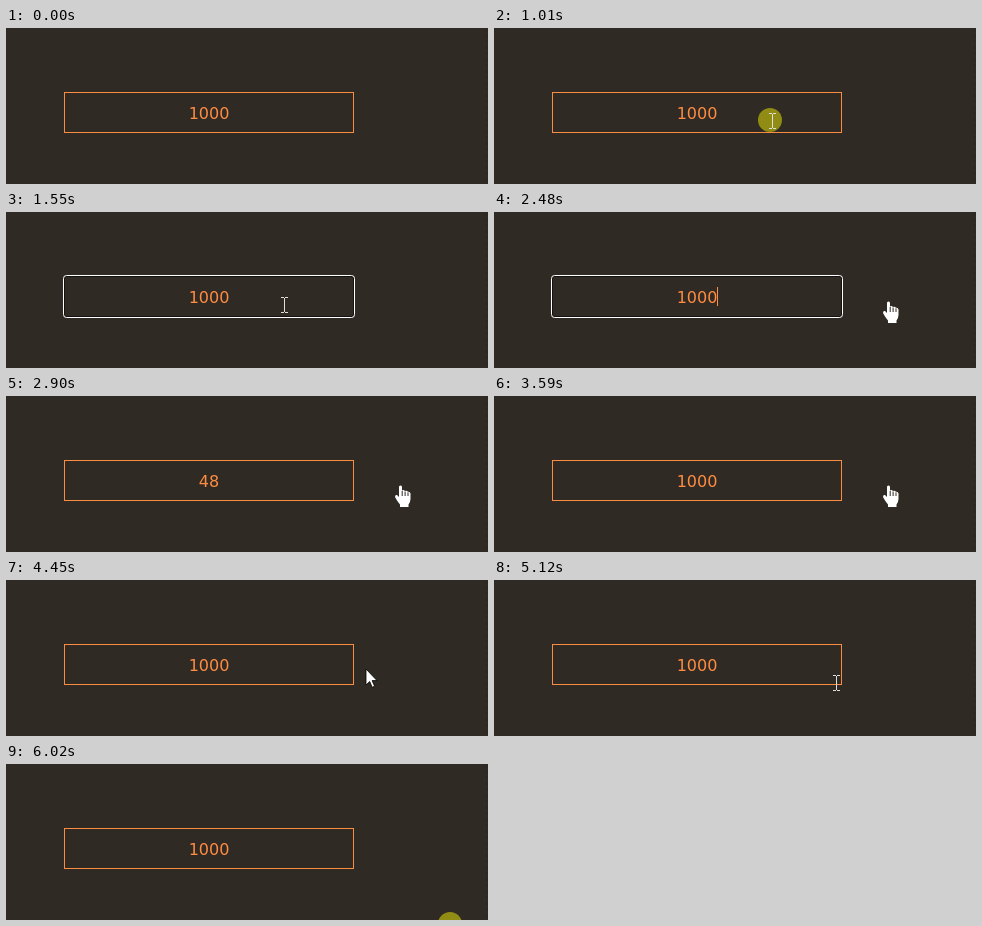
Animation of 482x156 px, one loop 6.15 s. Source, as an HTML page:

```html
<!DOCTYPE html>
<html lang="en">
<head>
<meta charset="utf-8">
<title>Counter input</title>
<style>
  html, body { margin: 0; width: 100%; height: 100%; overflow: hidden; background: #302a24; }
  svg { display: block; }
  text { font: 16px "DejaVu Sans", Verdana, sans-serif; fill: #ff8c42; text-anchor: middle; }
  .line { fill: none; stroke-width: 1; }
</style>
</head>
<body>
<svg width="482" height="156" viewBox="0 0 482 156">
  <path class="line" d="M480.5 0V156" stroke="#29241f" stroke-dasharray="3 3"/>
  <rect id="border" class="line" x="58.5" y="64.5" width="289" height="40" stroke="#f98b42"/>
  <g id="focus" class="line">
    <rect x="58.5" y="64.5" width="289" height="40" rx="2" stroke="#14110e"/>
    <rect x="57.5" y="63.5" width="291" height="42" rx="3" stroke="#fff"/>
  </g>
  <text id="value" x="203" y="91">1000</text>
  <rect id="caret" x="223" y="75" width="1" height="19" fill="#ff8c42"/>
  <g id="pointer">
    <circle id="press" cx="-2" cy="-1" r="12" fill="#918c14"/>
    <path id="beam" class="line" stroke="#e0deda"
      d="M-3-7.5H0M1-7.5H4M.5-7V7M-3 7.5H0M1 7.5H4"/>
    <path id="arrow" fill="#fff" stroke="#000" stroke-width=".8"
      d="M0 0V16L3.7 12.5 6.2 18.3 8.6 17.2 6.1 11.6H11Z"/>
    <g id="hand">
      <path fill="#fff" d="M-1 .5Q.5-1.5 2 .5V4.5Q3.8 3.4 5 5Q6.8 4.1 8 5.8Q10 5.3 10.5 7.5V13Q10.5 16 8.5 18.5V21H0V18.5Q-3 15-5 11Q-5 8.5-3 9L-1 11Z"/>
      <path class="line" stroke="#302a24" stroke-width=".8" d="M2.2 5V10M5.1 5.5V10M8 6.3V10"/>
    </g>
  </g>
</svg>
<script>
const LOOP = 6150, TICK = 67.45;
const COUNT_START = 2695, COUNT_TIME = 900;
const el = id => document.getElementById(id);
const show = (id, on) => el(id).setAttribute('visibility', on ? 'visible' : 'hidden');
const within = (v, from, to) => v >= from && v < to;

// Pointer path: tick, x, y
const path = [
  [3, 390, 165], [4, 375, 147], [6, 335, 120], [8, 300, 101], [11, 278, 93],
  [27, 278, 93], [29, 340, 91], [31, 394, 90],
  [65, 394, 90], [67, 325, 87], [68, 309, 89],
  [75, 309, 89], [76, 342, 103], [79, 402, 126], [81, 437, 146], [82, 446, 161]
];

function pointerAt(tick) {
  const next = path.findIndex(key => key[0] > tick);
  if (next < 0) return path[path.length - 1].slice(1);
  if (next === 0) return path[0].slice(1);
  const [t0, x0, y0] = path[next - 1], [t1, x1, y1] = path[next];
  const p = (tick - t0) / (t1 - t0);
  return [Math.round(x0 + (x1 - x0) * p), Math.round(y0 + (y1 - y0) * p)];
}

function countAt(ms) {
  const p = (ms - COUNT_START) / COUNT_TIME;
  if (p < 0 || p >= 1) return 1000;
  const eased = p < .5 ? 4 * p ** 3 : 1 - 4 * (1 - p) ** 3;
  return Math.round(1000 * eased);
}

function draw() {
  const tick = Math.floor((performance.now() % LOOP + 15) / 67.5);
  const [x, y] = pointerAt(tick);
  const inRow = within(y, 64, 106);
  const beam = inRow && within(x, 58, 349);
  const hand = inRow && x > 365;
  const focused = within(tick, 16, 38);

  el('pointer').setAttribute('transform', `translate(${x} ${y})`);
  show('beam', beam);
  show('hand', hand);
  show('arrow', !beam && !hand);
  show('press', within(tick, 15, 17) || within(tick, 37, 39) || tick >= 89);
  show('border', !focused);
  show('focus', focused);
  show('caret', focused && !within(tick, 23, 31));
  el('value').textContent = countAt(tick * TICK);
  requestAnimationFrame(draw);
}
draw();
</script>
</body>
</html>
```
